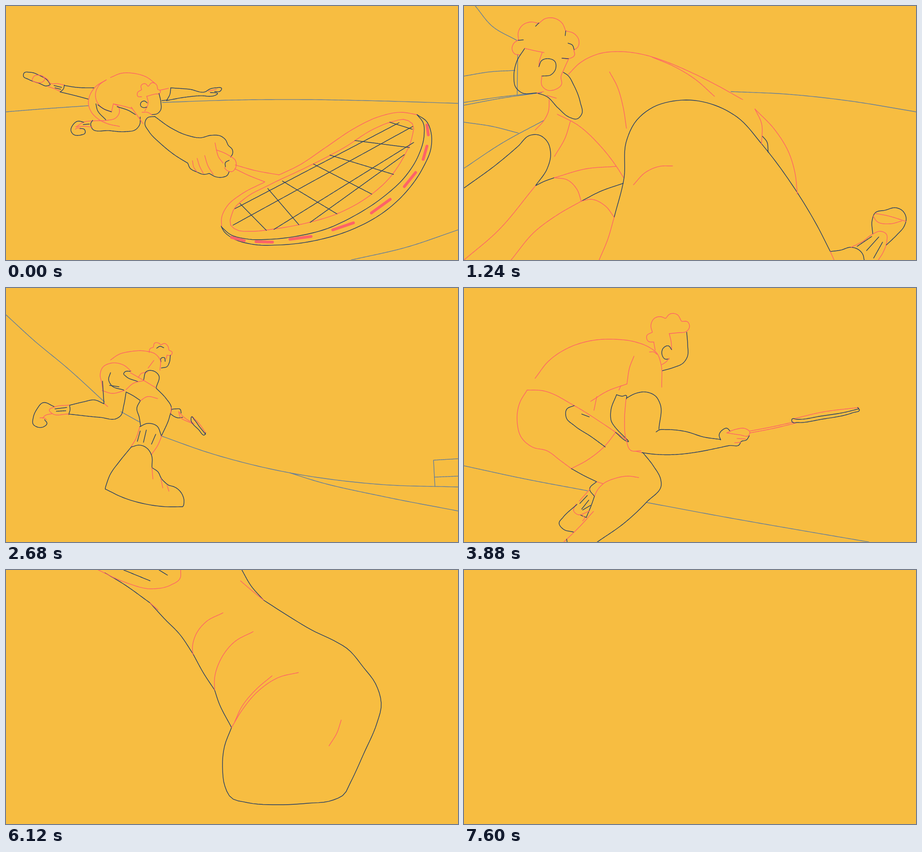
Recreate the animation shown at these times as an HTML page with a canvas. Size 960x540 px, loop 7720 ms.

```html
<!DOCTYPE html>
<html lang="en">
<head>
<meta charset="utf-8">
<title>Racket player</title>
<style>
html, body { margin: 0; width: 100%; height: 100%; overflow: hidden; background: #f7bd41; }
canvas { display: block; width: 100vw; height: 100vh; }
</style>
</head>
<body>
<canvas id="stage" width="960" height="540"></canvas>
<script>
const LOOP = 7720, END = 7600, SAMPLES = 90;
const INK = { n: '#203c66', p: '#fe6367', g: '#627e9b', d: '#fe6367' };
const ctx = document.getElementById('stage').getContext('2d');
const keys = [];
const mix = (a, b, u) => a + (b - a) * u;
const mixPoint = (p, q, u) => [mix(p[0], q[0], u), mix(p[1], q[1], u)];

// Smooth curve through the points (a doubled point is a corner), evenly resampled.
function sample(pts) {
  const gap = (a, b) => Math.hypot(b[0] - a[0], b[1] - a[1]);
  const tangent = i => {
    const p = pts[i], a = pts[i - 1] || p, b = pts[i + 1] || p;
    const wa = gap(a, p) ** 2 || 1, wb = gap(p, b) ** 2 || 1;
    const d = [0, 1].map(k => (p[k] - a[k]) / wa + (b[k] - p[k]) / wb);
    const len = Math.hypot(...d) || 1;
    return [d[0] / len, d[1] / len];
  };
  const fine = [pts[0]];
  for (let i = 0; i + 1 < pts.length; i++) {
    const p = pts[i], q = pts[i + 1], size = gap(p, q), a = tangent(i), b = tangent(i + 1);
    for (let s = 1; size && s <= 16; s++) {
      const u = s / 16, v = 1 - u;
      fine.push([0, 1].map(k =>
        p[k] * v * v * (1 + 2 * u) + q[k] * u * u * (3 - 2 * u) + size * u * v * (a[k] * v - b[k] * u)));
    }
  }
  const run = [0];
  for (let i = 1; i < fine.length; i++) run.push(run[i - 1] + gap(fine[i - 1], fine[i]));
  const total = run[run.length - 1];
  let j = 0;
  return Array.from({ length: SAMPLES }, (_, s) => {
    const at = total * s / (SAMPLES - 1);
    while (j < fine.length - 2 && run[j + 1] < at) j++;
    return mixPoint(fine[j], fine[j + 1], Math.min(1, (at - run[j]) / (run[j + 1] - run[j])));
  });
}

// Each line: ink, optional part name shared between poses, points.
function pose(time, text) {
  const strokes = new Map();
  text.trim().split('\n').forEach((line, i) => {
    const [ink, ...rest] = line.trim().split(' ');
    const name = rest[0].includes(',') ? time + '-' + i : rest.shift();
    strokes.set(name, { ink, pts: sample(rest.map(s => s.split(',').map(Number))) });
  });
  keys.push({ time, strokes });
}

// Later view of some parts of the last drawn pose: zoom about the shoe, then shift.
function zoomPose(time, base, names, zoom, dx, dy) {
  const strokes = new Map(names.map(name => {
    const { ink, pts } = base.strokes.get(name);
    return [name, { ink, pts: pts.map(([x, y]) => [630 + (x - 630) * zoom + dx, 330 + (y - 330) * zoom + dy]) }];
  }));
  keys.push({ time, strokes });
}

pose(0, `g hz 0,225 88,218 175,212
g hz2 332,205 480,200 640,199 800,202 960,207
g 733,540 850,513 960,476
n 94,167 88,158 72,148 52,141 38,143 37,149 48,156 72,165 86,170 93,168
p 55,158 60,149 70,147 79,150 82,156 78,161 70,163 57,160
p 79,150 88,156 94,164 110,165 123,168
p 89,171 103,176 116,182
n 124,168 122,176 115,183
n 102,169 118,173
n 104,174 116,177
n 124,169 150,173 187,174
n 116,183 145,190 175,198
p 213,157 191,171 178,190 175,207 183,228 197,241 215,250 241,256
p 213,157 198,168 190,188 195,207 210,220 224,225 224,225 228,208 228,208 250,213 268,218
p 228,208 238,213 241,225 233,238 215,243 190,244 165,247 150,256
n 191,208 194,221 212,242
n 195,210 208,219 224,225
n 236,214 262,223 275,231
n 184,243 180,250 182,259 220,265 255,267 275,263 284,252 285,236
p 266,215 276,229 291,250
n 165,247 152,245 142,253 138,265 142,272 160,274 168,270 167,263 157,260
p 148,257 155,256 183,257
p 147,262 153,259 158,262
n 164,252 177,251
p back 222,152 245,143 270,143 300,152 316,164
p hair 288,193 280,192 279,185 288,178 288,178 287,169 295,165 302,171 302,171 311,163 320,168 322,177 322,177 328,181 326,186 318,187 299,192
p brow 299,192 302,206 295,223
n ear 300,206 294,202 287,205 286,212 292,216 299,215
n face 325,186 329,205 328,222 321,229 309,231
p 289,226 300,226 310,231
p 327,179 345,175
n 331,201 343,200
n 350,174 348,188 341,201
n 350,174 390,177 424,182 432,177 445,174 458,176 455,181 443,182
n 341,201 380,194 420,191 432,192 444,190 449,187 434,184
p 430,181 447,177
n 316,235 350,259 385,275 414,280 435,275 457,277 466,284 472,296 481,306 481,315 477,321
n 316,235 300,238 295,250 303,266 330,294 360,318 386,334 386,334 391,345 405,353 405,353 420,358 432,356 432,356 445,363 460,364 470,360 474,352
p 396,329 399,343 406,353
p 406,324 411,340 419,356
p 422,318 429,340 440,358
p 444,291 447,306 451,320 461,334
p 447,306 465,313 479,321
p 478,320 487,328 488,343 480,352 470,350 464,344
n 474,328 466,333 466,342
p h1 487,338 530,350 580,359 580,359 620,340 680,300 740,260 790,236 840,226 873,231
p h2 486,346 515,360 550,374 550,374 500,400 470,425 458,450 458,470
p rp 476,455 484,432 510,407 560,380 640,342 720,300 780,262 820,246 850,242 863,250 862,280 845,320 815,365 770,405 700,443 640,461 570,474 520,479 490,476 477,466 476,455
n rn 873,231 893,245 903,270 903,300 885,345 850,395 800,440 740,473 660,498 580,508 520,506 480,493 462,478 457,468
n 873,231 886,248 888,275 875,320 850,360 800,407 740,446 680,474 620,489 560,496 510,495 475,485 458,470
n 486,431 835,248
n 482,466 864,256
n 569,475 866,290
n 646,460 846,316
n 497,420 553,477
n 556,388 622,465
n 587,372 703,442
n 653,336 777,400
n 688,317 823,358
n 741,286 857,301
n 815,247 863,262
d 894,253 897,274
d 894,298 886,326
d 870,354 846,384
d 816,411 776,440
d 738,461 694,476
d 648,490 603,496
d 566,502 531,501
d 506,499 479,492`);

pose(1240, `g 24,0 60,43 112,73
g 114,103 113,188
g hz 0,149 55,140 108,137
g 0,205 80,193 155,185
g 0,211 80,196 165,184
g 0,247 60,256 115,270
g hz3 0,345 80,292 170,243
g hz2 567,182 680,187 820,202 960,225
p hair 119,104 108,102 102,91 106,79 116,72 116,72 115,57 124,41 142,34 159,37 159,37 172,27 192,26 208,36 216,53 216,53 233,58 244,73 242,87 233,94 233,94 235,104 222,112 209,111
n 152,43 159,36
n 216,53 215,63
n 221,79 230,83 234,93
n 208,111 222,112
n 115,73 126,72
n face 129,90 112,118 106,150 110,173 122,184 155,185
p 129,90 150,95 170,99
p brow 166,99 160,118 159,129
n ear 159,129 165,116 180,112 193,118 195,132 185,146 165,149
p 165,149 166,170 175,178 195,177 207,167 206,150 212,135 222,113
n 155,185 175,192 200,217 225,237 240,240 250,230 247,205 233,168 220,147 211,141
p 155,185 169,182
p 176,190 196,196
p back 222,145 245,122 285,102 335,97 380,103 420,115 480,140 540,170 592,199
p 400,109 445,128 490,155 532,192
p slv 309,140 325,170 338,215 345,260
p 181,199 179,225 170,243 151,264
p 198,230 240,252 290,298 325,343 339,365
p 226,245 215,280 192,320
n 0,387 70,336 115,298 140,275 158,274 176,287 184,315 177,345 152,382
n 152,382 170,373 192,365
p 192,365 260,346 323,341
p 192,365 220,370 240,390 249,415
n 249,415 290,394 338,377
p 249,415 270,411 300,425 319,449
p 0,540 70,480 152,382
p 100,540 150,480 200,443 249,415
n leg 319,449 340,365 345,287 365,245 400,216 445,202 480,200 530,210 580,236 632,293 710,400 750,467 778,522
p 319,449 305,497 287,540
p 360,380 385,354 415,341 443,340
p 618,219 632,250 632,293
n 634,277 643,288 646,311
p 618,219 660,263 690,312 703,355 708,400
n 778,522 800,519 822,513 838,518 847,528 850,540
p 778,522 786,540
p 822,513 846,501 868,485 885,479 897,485 898,500 890,524 880,540
n s1 835,511 866,490
n s2 855,520 881,491
n s3 870,536 889,502
n 897,508 920,486 935,468 939,450 931,435 918,429 895,434 873,440 867,455 868,484
p 873,441 900,446 939,458
p 869,446 876,457 905,463 930,457`);

pose(2680, `g hz 0,57 60,112 130,170 209,242
g 244,263 284,285
g hz2 331,315 430,350 520,375 603,393 700,408 800,418 960,423
g hz3 603,393 660,411 800,443 960,474
g 960,363 908,366 908,366 911,422
g 910,402 960,400
p hair 304,137 306,129 313,126 313,126 316,117 324,117 329,121 329,121 337,118 344,124 346,132 346,132 353,137 350,143 342,143
n 320,128 327,124 335,127
n face 349,143 347,158 342,167 330,170
n ear 329,157 329,150 336,148 338,156
p brow 342,143 340,151
p back 222,153 240,141 265,135 295,134 318,141 327,152 327,175
p slv 314,154 302,170
p sh 206,218 203,200 200,185 206,168 222,160 250,164 266,177
p hem 204,218 225,224 252,218
n 222,180 218,195 224,207 250,217
n 220,207 240,210
n hand 264,177 253,178 250,182 255,188 280,199
p 281,190 287,182 300,179
n sleeve 292,196 299,177 312,176 324,185 319,212
p sh2 264,180 290,195 318,212
n 255,221 270,229 285,239
n leg 319,213 340,235 351,253 347,275 330,315
p 255,216 270,203 292,197
p knee 285,240 300,231 322,235
n 285,240 278,255 283,275 286,294
n cuff 284,295 300,288 320,293 330,314
p sk 284,296 276,320 266,337
p 331,314 322,335 309,354
n s1 285,304 279,326
n s2 298,302 292,328
n s3 318,311 309,332
n shoe 266,338 240,370 222,395 210,427 210,427 250,446 300,460 340,465 377,465 377,465 378,450 372,435 360,424 344,419 344,419 330,405 323,391 310,382 310,382 309,355 300,341 285,334 266,338
p 310,382 312,406
p 329,405 333,425
p 342,419 346,432
n 205,198 208,246
p 209,246 216,252
n 255,222 250,250 243,272 236,277 200,275 133,268
n 136,249 165,242 188,238 208,246
n 135,249 136,259 133,269
p 134,249 103,253 92,260 97,266 133,268
n 104,257 129,254
n 107,262 127,261
n fs 102,252 78,244 66,257 58,275 58,290 65,295 80,295 87,288 82,280
p 98,267 82,272 78,277
p 72,276 80,276 86,280
n 351,258 360,257 370,258 372,266
n al 349,267 357,273 365,276 375,275
p 351,254 350,267
p h1 367,263 376,273 400,289
p h2 367,263 369,272 395,288
p rp 395,273 410,288 424,308
n rn 424,308 422,312 409,301 393,278 394,274 400,280 411,295 424,311`);

pose(3880, `g hz 0,378 130,406 262,431
g hz2 388,456 560,488 720,516 860,540
p hair 403,115 391,113 388,102 400,94 400,94 397,79 405,64 418,61 428,65 428,65 438,55 452,56 462,71 462,71 475,72 479,82 473,92 455,95 436,97
p brow 436,97 440,115 441,131
p 403,115 406,132
n face 473,94 475,120 474,147 466,159 445,169 421,176
n ear 441,131 434,123 424,127 421,143 427,151 435,151
p 436,149 428,158 420,163
p back 151,192 180,155 220,128 270,112 320,109 365,115 395,127 410,139 418,160 420,211
p 394,136 403,136 410,141
p slv 361,145 352,168 346,204
p 346,204 305,219 269,241
p 282,231 276,260
p 333,208 329,217
p hem 228,384 260,367 300,335 322,307
p sh 228,384 205,367 176,346 145,338 122,318 113,285 118,245 134,217
p sh2 134,217 165,218 234,250 290,285 347,324
n hand 234,250 218,258 217,275 235,293 270,316 300,338
n 250,268 266,274
n 324,227 312,260 312,280 346,326 322,307
n 324,227 336,230 345,229 345,236
n sleeve 345,234 365,224 385,221 408,231 416,245 414,300
n 408,306 414,302 430,301 470,305 510,317 545,322
p 344,236 341,280 345,325 354,345 376,346
p 365,347 378,350
n 545,323 542,312 550,301 558,298 565,304
n al 378,350 400,353 450,354 500,348 540,340 564,335 585,333 588,327 600,323 606,314
p 558,308 575,301 600,300 607,306 605,313 585,312 558,308
p 580,320 598,321
p 575,329 588,328
p h1 608,304 655,295 700,285
p h2 608,308 655,299 705,287
p rp 700,278 760,264 838,254
n rn 836,254 840,259 826,265 760,279 708,286 697,285 697,278 705,279 760,272 810,264 838,257
n leg 380,350 402,378 418,408 419,418 388,455 340,500 283,540
n 228,384 255,399 282,412
p 282,412 295,416
p knee 371,403 350,400 320,405 296,416 282,432 277,443
n 281,412 267,427 277,443 277,443 270,463 260,487
p 268,427 245,453
p 238,459 233,474 240,481 267,474
n fs 240,460 210,488 202,500 210,512 233,519
n s1 262,441 246,458
n s2 265,451 250,470
n s3 269,462 252,472
n 248,483 260,488
p 253,484 256,489 252,495
p 275,475 245,508 212,540
n 218,534 219,540`);

pose(5080, `g hz2 487,282 600,221 700,164 786,113 786,113 800,110 880,78 960,48
g hz 333,357 243,392 120,434 0,467
g 243,392 120,447 0,499
p hair 397,0 398,7 407,10 417,8
n face 404,10 402,38 412,44 434,45
p brow 417,8 419,18 423,22
n ear 422,22 425,13 434,13 435,25 428,29 422,23
p 449,0 442,6 440,35
n 430,30 438,42 447,55 444,58 436,51 432,43
p back 442,32 465,28 490,42 508,70 518,118
p 442,36 455,33 464,38
p 434,50 440,62 454,78 442,112
n sleeve 454,54 457,46 467,44 478,51 491,75 490,95 478,125 466,142 454,156
p 455,53 470,72
n 470,72 455,102 437,125 410,127
n 443,65 446,75 444,92 425,108 395,122
p 442,112 405,127 450,126
n 382,128 385,118 391,116 397,122
p h1 375,95 383,112 388,127
p h2 379,95 386,112 391,127
p rp 352,92 365,96 385,90 393,83
n rn 392,78 375,78 356,86 352,92 360,92 380,87 392,82 392,78
n 360,91 383,87
n 366,86 365,94
n 378,84 379,92
n leg 381,128 330,131 270,136 222,147 203,163 199,185 210,203 247,230 280,270 305,300
p knee 285,163 320,165 365,177 395,180 430,177 464,171
p sh 464,176 500,155 515,133 505,121 486,112
n 495,115 492,132 466,143
n 370,178 385,178
n 463,172 498,156
p 437,127 420,129 407,135 404,142 422,135
p 420,136 398,148 405,154 432,136
p 405,154 410,162 425,155 440,140
p 410,162 420,167 433,160 447,145
p 422,166 433,168 446,157 456,153 458,166
n 463,177 429,187 434,187 448,200 453,228 462,250 479,278
p 383,177 412,182 427,195 432,238
p 412,215 428,237 455,258 485,285 534,304
p 217,200 230,212 247,230
n cuff 305,300 308,287 325,265 360,247 400,241 430,245 452,256
n 320,307 335,332 345,362
n s1 343,281 357,305 374,330
n s2 389,261 406,283 425,299
n s3 429,261 443,276 466,291
p sk 305,302 325,336 337,375 340,404
n shoe 340,405 360,365 390,332 430,308 480,300 534,305 610,328 680,346 740,370 790,404 820,435 830,450 815,462 680,540
n b1 340,405 333,435 333,435 312,443 294,460
n b2 294,460 272,473 253,492
n b3 253,492 220,509 195,520 178,540
p c1 319,504 322,475 332,435
p c2 266,540 275,495 294,460
p c3 236,529 242,510 253,492`);

pose(6120, `n b1 210,6 250,30 306,70 306,70 335,102 370,138 397,178
n b2 397,178 420,220 443,255
n b3 443,255 452,282 479,335
n shoe 547,64 600,98 650,128 700,152 722,165 760,208 785,242 797,288 788,325 760,390 730,455 718,477 695,489 640,496 580,499 510,494 478,484 465,460 460,425 464,375 479,335
n leg 501,0 520,33 547,64
p 498,23 520,42 547,64
p cuff 196,0 250,25 310,40 350,32 370,17 371,0
n s1 250,0 306,23
n s2 325,0 343,11
p 306,70 323,85
p c1 461,91 425,110 402,140 396,165 397,180
p c2 525,131 485,153 455,192 443,230 443,255
p c3 621,218 580,228 535,258 500,300 479,335
p tongue 565,225 530,255 500,292 486,322
p heel 712,319 703,346 686,374`);

const shoe = keys[keys.length - 1], parts = ['shoe', 'b2', 'b3', 'c2', 'c3', 'tongue', 'heel'];
zoomPose(6480, shoe, parts, 1, 60, 40);
zoomPose(7240, shoe, parts, 1.2, 60, 90);
zoomPose(END, shoe, parts, 7.5, 0, 0);

// Zoom and shift that carry the shared parts of one pose onto the next.
function fit(a, b) {
  const from = [], to = [];
  for (const [name, s] of a.strokes) {
    const other = b.strokes.get(name);
    if (other && s.ink !== 'g') { from.push(...s.pts); to.push(...other.pts); }
  }
  const mean = pts => [0, 1].map(k => pts.reduce((sum, p) => sum + p[k], 0) / pts.length);
  const spread = (pts, c) => pts.reduce((sum, p) => sum + Math.hypot(p[0] - c[0], p[1] - c[1]), 0);
  const c = mean(from), d = mean(to);
  return { c, d, zoom: spread(to, d) / spread(from, c) };
}
for (let i = 0; i + 1 < keys.length; i++) keys[i].fit = fit(keys[i], keys[i + 1]);

function draw(ink, pts, part = 1) {
  const last = Math.round(part * (SAMPLES - 1));
  if (last < 1) return;
  ctx.strokeStyle = INK[ink];
  ctx.lineWidth = ink === 'd' ? 6 : 1.4;
  ctx.beginPath();
  for (let i = 0; i <= last; i++) ctx.lineTo(...pts[i]);
  ctx.stroke();
}

function render(time) {
  ctx.fillStyle = '#f7bd41';
  ctx.fillRect(0, 0, 960, 540);
  if (time >= END) return;
  const i = keys.findIndex((k, n) => time >= k.time && time < keys[n + 1].time);
  const a = keys[i], b = keys[i + 1], u = (time - a.time) / (b.time - a.time);
  const { c, d, zoom } = a.fit;
  const carry = (pts, from, to, z, v) =>
    pts.map(p => mixPoint(p, [0, 1].map(k => to[k] + (p[k] - from[k]) * z), v));
  for (const [name, s] of a.strokes) {
    const other = b.strokes.get(name);
    if (other) draw(s.ink, s.pts.map((p, k) => mixPoint(p, other.pts[k], u)));
    else draw(s.ink, carry(s.pts, c, d, zoom, u), 1 - 2 * u);
  }
  for (const [name, s] of b.strokes) {
    if (!a.strokes.has(name)) draw(s.ink, carry(s.pts, d, c, 1 / zoom, 1 - u), 2 * u - 1);
  }
}

ctx.lineCap = ctx.lineJoin = 'round';
const start = performance.now();
function tick() {
  const t = (performance.now() - start) % LOOP;
  const shift = t < 1200 ? 0 : 40;
  render(t >= END ? END : Math.floor((t - shift) / 80) * 80 + shift);
  requestAnimationFrame(tick);
}
tick();
</script>
</body>
</html>
```
